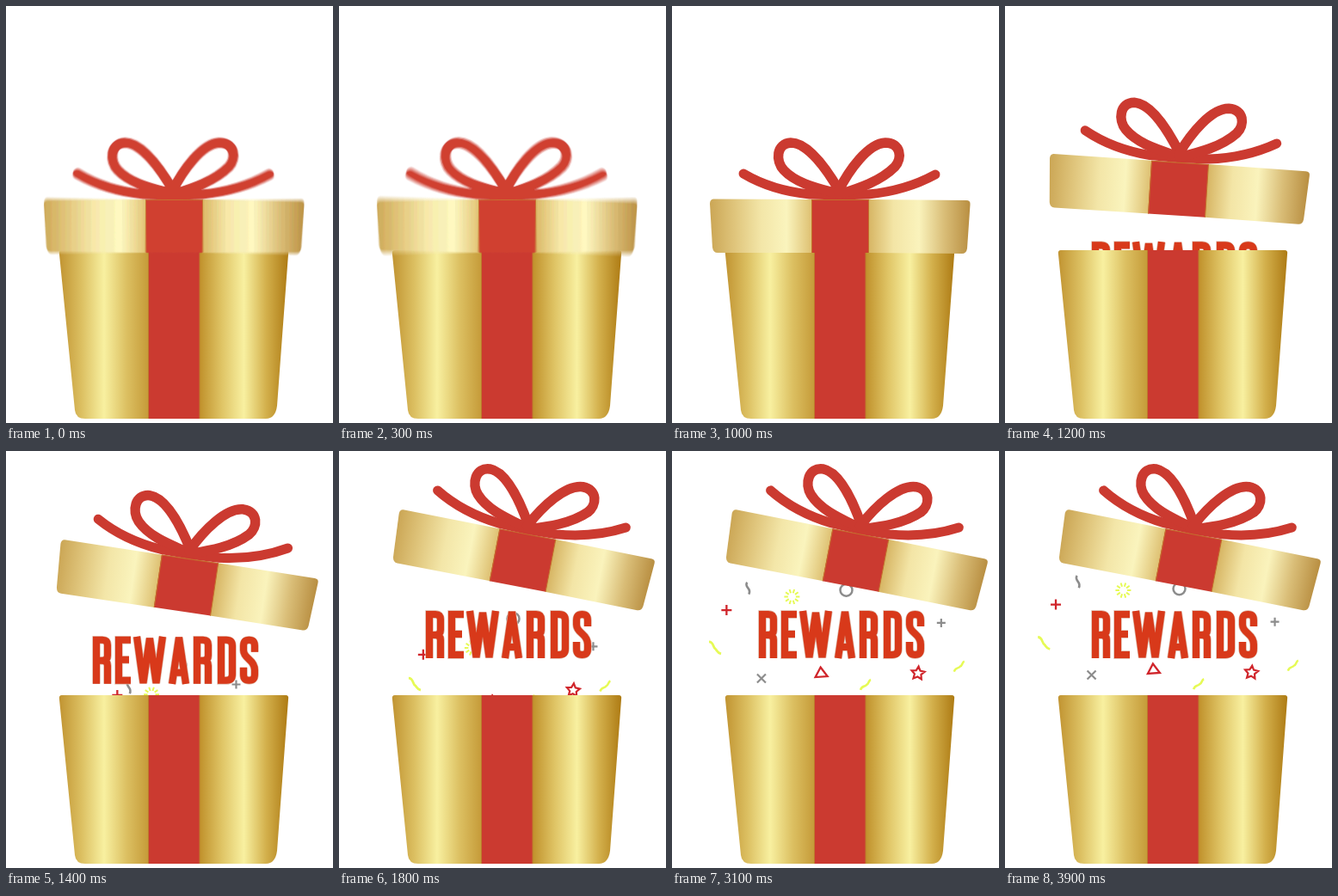
These frames come from a looping animation (380x485 px, 4 s). An HTML page with a canvas:

```html
<!DOCTYPE html>
<html lang="en">
<head>
<meta charset="utf-8">
<title>Rewards</title>
<style>
html, body { margin: 0; width: 100%; height: 100%; overflow: hidden; background: #fff; }
canvas { display: block; }
</style>
</head>
<body>
<canvas id="stage" width="380" height="485" role="img" aria-label="REWARDS">REWARDS</canvas>
<script>
const W = 380, H = 485, LOOP = 4000, STEP = 100;
const RED = '#cb3a30', ICON_RED = '#d0252b', GREY = '#8c8c8c', YELLOW = '#e6fa55';
const ctx = document.getElementById('stage').getContext('2d');

function makeLayer() {
  const canvas = document.createElement('canvas');
  canvas.width = W;
  canvas.height = H;
  return canvas.getContext('2d');
}

function gradient(c, x0, x1, colors) {
  const g = c.createLinearGradient(x0, 0, x1, 0);
  colors.forEach((color, i) => g.addColorStop(i / (colors.length - 1), color));
  return g;
}

function fillPath(c, d, style) {
  c.fillStyle = style;
  c.fill(new Path2D(d));
}

function strokePath(c, d, style, width) {
  c.strokeStyle = style;
  c.lineWidth = width;
  c.stroke(new Path2D(d));
}

// CSS "ease" curve, solved by bisection
function ease(x) {
  if (x <= 0) return 0;
  if (x >= 1) return 1;
  let lo = 0, hi = 1;
  for (let i = 0; i < 24; i++) {
    const s = (lo + hi) / 2, r = 1 - s;
    if (0.75 * r * r * s + 0.75 * r * s * s + s * s * s < x) lo = s; else hi = s;
  }
  const r = 1 - lo;
  return 0.3 * r * r * lo + 3 * r * lo * lo + lo ** 3;
}

function drawBody(c) {
  const left = gradient(c, 62, 166, ['#c19432', '#dcc062', '#f8f0a0', '#dcc062', '#c59a38']);
  const right = gradient(c, 225, 328, ['#c0912b', '#dfc465', '#f8f0a0', '#d3b04c', '#ae7b14']);
  fillPath(c, 'M65 284H166V480H92Q81 480 80 470L62 289Q61 284 65 284Z', left);
  fillPath(c, 'M225 284H325Q329 284 328 289L315 465Q313 480 302 480H225Z', right);
  fillPath(c, 'M166 284H225V480H166Z', RED);
  strokePath(c, 'M165.5 284V480M225 284V480', '#bd7a2c', 1);
}

function drawBow(c) {
  c.lineCap = c.lineJoin = 'round';
  strokePath(c, 'M83 195C105 208 130 216 160 219L195 220L228 219C260 216 284 208 306 196', RED, 11);
  strokePath(c, 'M195 216C180 190 158 159 138 159C121 160 120 180 130 191C145 207 170 212 195 219', RED, 11.5);
  strokePath(c, 'M193 216C206 190 228 160 248 159C266 159 268 177 259 187C242 204 217 212 195 219', RED, 11.5);
  c.lineCap = 'butt';
  c.lineJoin = 'miter';
}

function drawLid(c) {
  drawBow(c);
  const left = gradient(c, 44, 163, ['#cba655', '#e0c67d', '#f3e6a8', '#faf4bd', '#ddbf70']);
  const right = gradient(c, 228, 346, ['#d6b462', '#f3e5a6', '#faf3bc', '#d9bd77', '#b98f42']);
  fillPath(c, 'M48 224.5L163 225V287H53Q48 287 47 281L44 230Q44 225 48 224.5Z', left);
  fillPath(c, 'M228 225L342 226Q347 226 346.500 231L343 282Q342 288 337 288L228 287Z', right);
  fillPath(c, 'M162 225H228.500V287H162Z', RED);
  strokePath(c, 'M162.500 225.500H228.500V287M162.500 225.500V287', '#c4702c', 1);
}

const lidSprite = makeLayer(), blurLayer = makeLayer();
drawLid(lidSprite);

function pivot(c, degrees, dx, dy) {
  c.translate(195 + dx, 225.5 + dy);
  c.rotate(degrees * Math.PI / 180);
  c.translate(-195, -225.5);
}

function drawShakingLid(swing) {
  const copies = 8;
  blurLayer.clearRect(0, 0, W, H);
  for (let i = 0; i < copies; i++) {
    blurLayer.save();
    blurLayer.globalCompositeOperation = 'lighter';
    blurLayer.globalAlpha = 1 / copies;
    pivot(blurLayer, swing * (2 * i / (copies - 1) - 1), 0, 0);
    blurLayer.drawImage(lidSprite.canvas, 0, 0);
    blurLayer.restore();
  }
  ctx.drawImage(blurLayer.canvas, 0, 0);
}

function drawOpeningLid(open) {
  ctx.save();
  pivot(ctx, 10.9 * open, 23.8 * open, -128.5 * open);
  drawLid(ctx);
  ctx.restore();
}

// Condensed block lettering, 55 px tall
const R = 'M4 55V4H11Q17 4 17 10V22Q17 28 11 28H4M11 28Q17 28 17 34V55';
const LETTERS = [
  [101, R],
  [127, 'M18 4H4V51H18M4 27H16'],
  [148, 'M4 0L11.500 54L19 2L26.500 54L34 0'],
  [189, 'M4 55L12 1L20 55M7 42H17'],
  [218, R],
  [246, 'M4 4V51H10Q17 51 17 44V11Q17 4 10 4Z'],
  [272, 'M17 18V11Q17 4 10.500 4Q4 4 4 11V16Q4 21 10.500 26.500Q17 32 17 39V44Q17 51 10.500 51Q4 51 4 44V36']
];

function drawTitle(y) {
  ctx.save();
  ctx.miterLimit = 2;
  for (const [color, width] of [['#dcb3a2', 9.4], ['#d8391a', 8]]) {
    for (const [x, d] of LETTERS) {
      ctx.save();
      ctx.translate(x, y);
      strokePath(ctx, d, color, width);
      ctx.restore();
    }
  }
  ctx.restore();
}

function starPath(radius) {
  let d = '';
  for (let i = 0; i < 10; i++) {
    const a = i * Math.PI / 5 - Math.PI / 2 + 0.1, r = i % 2 ? radius * 0.5 : radius;
    d += (i ? 'L' : 'M') + r * Math.cos(a) + ' ' + r * Math.sin(a);
  }
  return d + 'Z';
}

function raysPath(inner, outer, count) {
  let d = '';
  for (let i = 0; i < count; i++) {
    const a = i * 2 * Math.PI / count, x = Math.cos(a), y = Math.sin(a);
    d += `M${inner * x} ${inner * y}L${outer * x} ${outer * y}`;
  }
  return d;
}

const RISING = 'M-6 6C-4 0 -1 3 1 0C4 -1 3 -5 6 -6';
const SLOW = 700, FAST = 430;

// end point, offset from it at 2300 ms, decay time, path, colour, line width
const CONFETTI = [
  [57, 175.5, 20, 30, SLOW, 'M-6 0H6M0 -6V6', ICON_RED, 2.3],
  [83, 148.5, 16.5, 35, SLOW, 'M-1 -7C-5 -1 5 0 1 7', GREY, 2.6],
  [136.5, 158.5, 9, 34.5, SLOW, raysPath(4.5, 9, 10), YELLOW, 2],
  [43, 221, 22, 24.5, SLOW, 'M-7 -7C-1 -7 -3 0 1 2C3 5 3 6 7 7', YELLOW, 2.8],
  [99, 258.5, 15.5, 19, SLOW, 'M-5 -5L5 5M5 -5L-5 5', GREY, 2.2],
  [172.6, 251, 3.2, 19, SLOW, 'M-1 -5.500L7 5L-7 6Z', ICON_RED, 2.3],
  [202.5, 160, 0, 11, FAST, 'M7 0A7 7 0 1 1 -7 0A7 7 0 1 1 7 0Z', GREY, 2.5],
  [313.7, 198.5, -5.7, 9, FAST, 'M-5 0H5M0 -5V5', GREY, 2.2],
  [286.5, 257.5, -4.5, 6.5, FAST, starPath(8), ICON_RED, 2.2],
  [335, 249.5, -8, 7.5, FAST, RISING, YELLOW, 2.5],
  [225.2, 271, -1.2, 6, FAST, RISING, YELLOW, 2.6]
];

function drawConfetti(t) {
  for (const [x, y, dx, dy, decay, d, color, width] of CONFETTI) {
    const k = Math.exp((2300 - t) / decay);
    ctx.save();
    ctx.translate(x + dx * k, y + dy * k);
    strokePath(ctx, d, color, width);
    ctx.restore();
  }
}

function swingAt(t) {
  return t <= 600 ? 1 + t / 600 : Math.max(0, 2 * (950 - t) / 350);
}

function draw(t) {
  const open = ease((t - 1030) / 780);
  const swing = swingAt(t);
  ctx.fillStyle = '#fff';
  ctx.fillRect(0, 0, W, H);
  if (t > 1150) {
    drawConfetti(t);
    drawTitle(186 + 133 * (1 - open));
  }
  drawBody(ctx);
  if (swing > 0) drawShakingLid(swing); else drawOpeningLid(open);
}

function tick() {
  draw(Math.floor(performance.now() % LOOP / STEP) * STEP);
  requestAnimationFrame(tick);
}
tick();
</script>
</body>
</html>
```
